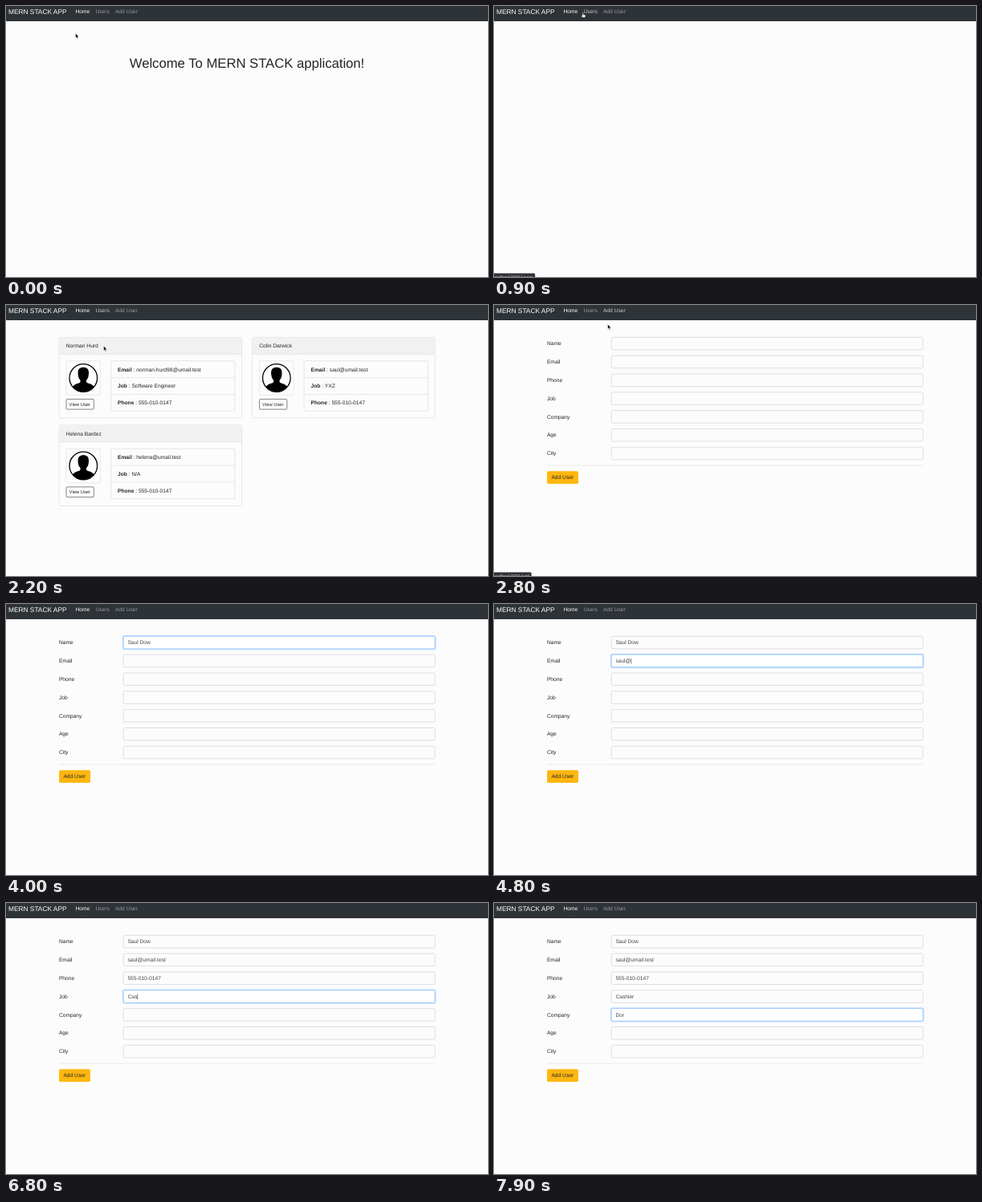
Write an HTML page that moves like this. It is 600 px wide and 338 px high and loops after 8000 ms.

```html
<!DOCTYPE html>
<html lang="en">
<head>
<meta charset="utf-8">
<title>MERN STACK APP</title>
<style>
html, body { margin: 0; width: 100%; height: 100%; overflow: hidden; background: #fdfcfd; }
svg { display: block; width: 600px; height: 338px; }
text { font: 6.667px "Liberation Sans", Arial, sans-serif; fill: #212529; text-rendering: geometricPrecision; white-space: pre; }
.bold { font-weight: bold; }
</style>
</head>
<body>
<svg id="stage" viewBox="0 0 600 338"></svg>
<script>
const LOOP = 8000, STEP = 100;
const stage = document.getElementById('stage');
const phone = '555-010-0147';

const people = [
  { name: 'Norman Hurd', email: 'norman.hurd98@umail.test', job: 'Software Engineer', x: 0, y: 0 },
  { name: 'Colin Darwick', email: 'saul@umail.test', job: 'YXZ', x: 240.5, y: 0 },
  { name: 'Helena Bardez', email: 'helena@umail.test', job: 'N/A', x: 0, y: 109.5 },
];

// Times: focus, first key, last key, blur
const fields = [
  { label: 'Name', value: 'Saul Dow', at: [3500, 3600, 4000, 4400] },
  { label: 'Email', value: 'saul@umail.test', at: [4400, 4600, 5200, 5300] },
  { label: 'Phone', value: phone, at: [5300, 5300, 6100, 6400] },
  { label: 'Job', value: 'Cashier', at: [6400, 6500, 7100, 7400] },
  { label: 'Company', value: 'Dor', at: [7400, 7600, 7900, 9000] },
  { label: 'Age' },
  { label: 'City' },
];

// Pointer path: time, x, y of the tip
const path = [
  [0, 86.5, 34], [200, 87, 33], [600, 110.5, 7.5], [1000, 110.5, 7.5], [1500, 114, 36],
  [2200, 121.5, 51], [2600, 145, 8], [2700, 145, 8], [2800, 141.5, 24], [3300, 180, 47], [3500, 182, 47],
];

const rect = (x, y, w, h, fill, stroke = 'none', r = 1.7, extra = '') =>
  `<rect x="${x}" y="${y}" width="${w}" height="${h}" rx="${r}" fill="${fill}" stroke="${stroke}" ${extra}/>`;
const text = (x, y, s, style = '') => `<text x="${x}" y="${y}" style="${style}">${s}</text>`;
const line = (x1, x2, y, color = '#dedfe0') => `<path d="M${x1} ${y}H${x2}" stroke="${color}" stroke-width=".7"/>`;
const thin = 'stroke-width=".7"';
const clamp = v => Math.max(0, Math.min(1, v));

function navbar(t) {
  const usersLit = t >= 600 && t < 2700, addLit = t >= 2600 && t < 3500;
  const link = (x, s, lit) => text(x, 9.4, s, `fill:${lit ? '#cacccd' : '#96999c'}`);
  return rect(0, 0, 600, 19, '#2e3337', 'none', 0) +
    text(3, 9.8, 'MERN STACK APP', 'font-size:8.333px;fill:#fff') +
    text(86.4, 9.4, 'Home', 'fill:#fff') + link(111.4, 'Users', usersLit) + link(135.9, 'Add User', addLit);
}

function avatar() {
  return rect(75, 69.7, 42.6, 42.6, '#fdfcfd', '#dee2e6', 1.7, thin) +
    `<circle cx="96.3" cy="91" r="17.3" fill="#fff" stroke="#000" stroke-width="1.3"/>
    <path d="M83.2 102.3C84 99 89 98.6 92.4 96.6L92.6 94C90.6 92 90 89.6 89.8 87.6
      C88.6 80 92 77.8 96.3 77.8S104 80 102.8 87.6C102.6 89.6 102 92 100 94L100.2 96.6
      C103.6 98.6 108.6 99 109.4 102.3A17 17 0 0 1 83.2 102.3Z"/>`;
}

function card(p) {
  const row = (y, k, v) => text(139, y, `<tspan class="bold">${k}</tspan> : ${v}`);
  return `<g transform="translate(${p.x} ${p.y})">` +
    rect(66, 40.4, 227.5, 100.6, '#fdfcfd', '#dcdddd', 1.7, thin) +
    rect(66.3, 40.7, 226.9, 20.5, '#f2f1f2', 'none', 1.3) + line(66, 293.5, 61.3) +
    text(74.8, 53, p.name) + avatar() +
    rect(75, 117.4, 34.3, 12.7, '#fdfcfd', '#50555a', 1.2, thin) +
    text(78.6, 125.8, 'View User', 'font-size:5.833px') +
    rect(130.5, 69.7, 154.3, 62.5, '#fdfcfd', '#dcdddd', 1.7, thin) +
    line(130.5, 284.8, 90.6) + line(130.5, 284.8, 111.4) +
    row(82.5, 'Email', p.email) + row(103.2, 'Job', p.job) + row(124, 'Phone', phone) + '</g>';
}

function field(f, i, t) {
  const y = 40.3 + i * 22.83;
  let out = text(65.9, y + 10, f.label);
  let glow = 0, typed = '', caret = false;
  if (f.at) {
    const [focus, start, end, blur] = f.at;
    glow = clamp((t - focus) / 150) * (1 - clamp((t - blur) / 150));
    typed = f.value.slice(0, Math.floor(f.value.length * clamp((t - start) / (end - start)) + 1e-6));
    caret = t >= focus && t < blur && (t < end || Math.floor((t - end) / 500) % 2 === 1);
  }
  out += rect(146.2, y, 387.8, 15.6, '#fdfcfd', '#ced2d6', 1.7, thin);
  if (glow) out += `<g opacity="${glow}">` +
    rect(145.5, y - .7, 389.2, 17, 'none', '#bfdeff', 2.3, 'stroke-width="1.4"') +
    rect(146.2, y, 387.8, 15.6, '#fff', '#80bdff', 1.7, thin) + '</g>';
  const mark = caret ? '<tspan dx="-.4" style="font-size:7px;fill:#222">|</tspan>' : '';
  return out + text(151.4, y + 10, typed + mark, 'fill:#43494f');
}

function form(t) {
  return fields.map((f, i) => field(f, i, t)).join('') + line(66, 534.3, 200.1, '#e3e3e4') +
    rect(66, 207.2, 39, 15.8, '#ffb60f') + text(71.4, 217.4, 'Add User');
}

function status(t) {
  const add = t >= 2600 && t < 3100;
  if (!add && !(t >= 600 && t < 1100)) return '';
  return rect(-4, 333.6, add ? 50.5 : 55, 8, '#303236', '#55575a', 1.4, 'stroke-width=".4"') +
    text(-2.4, 340.2, 'localhost:3001/' + (add ? 'add' : 'users'), 'font-size:5.5px;fill:#d5d6d7');
}

function pointer(t) {
  if (t >= 3600) return '';
  const i = Math.max(1, path.findIndex(p => p[0] >= t));
  const [a, b] = t > 3500 ? [path.at(-1), path.at(-1)] : [path[i - 1], path[i]];
  let k = clamp((t - a[0]) / (b[0] - a[0] || 1));
  k = k * k * (3 - 2 * k);
  const x = a[1] + (b[1] - a[1]) * k, y = a[2] + (b[2] - a[2]) * k;
  const hand = y < 13 && x > 108;
  const shape = hand
    ? '<path d="M-.6 .4Q0-.5 .6 .4V3L2.6 3.4Q3.7 3.7 3.5 4.7L2.9 7H-.5L-2 4.6Q-1.7 3.6-.6 4.6Z" fill="#fff" stroke="#111" stroke-width=".5"/>'
    : '<path d="M0 0V6L1.4 4.8L2.3 6.9L3.3 6.5L2.4 4.4H4.2Z" fill="#000" stroke="#fff" stroke-width=".5"/>';
  return `<g transform="translate(${x} ${y})">${shape}</g>`;
}

function page(t) {
  if (t < 800) return text(300, 77.4, 'Welcome To MERN STACK application!', 'font-size:16.667px;text-anchor:middle');
  if (t < 1000) return '';
  return t < 2800 ? people.map(card).join('') : form(t);
}

let shown = -1;
function draw() {
  const t = Math.floor(performance.now() % LOOP / STEP) * STEP;
  if (t !== shown) {
    stage.innerHTML = page(t) + navbar(t) + status(t) + pointer(t);
    shown = t;
  }
  requestAnimationFrame(draw);
}
draw();
</script>
</body>
</html>
```
